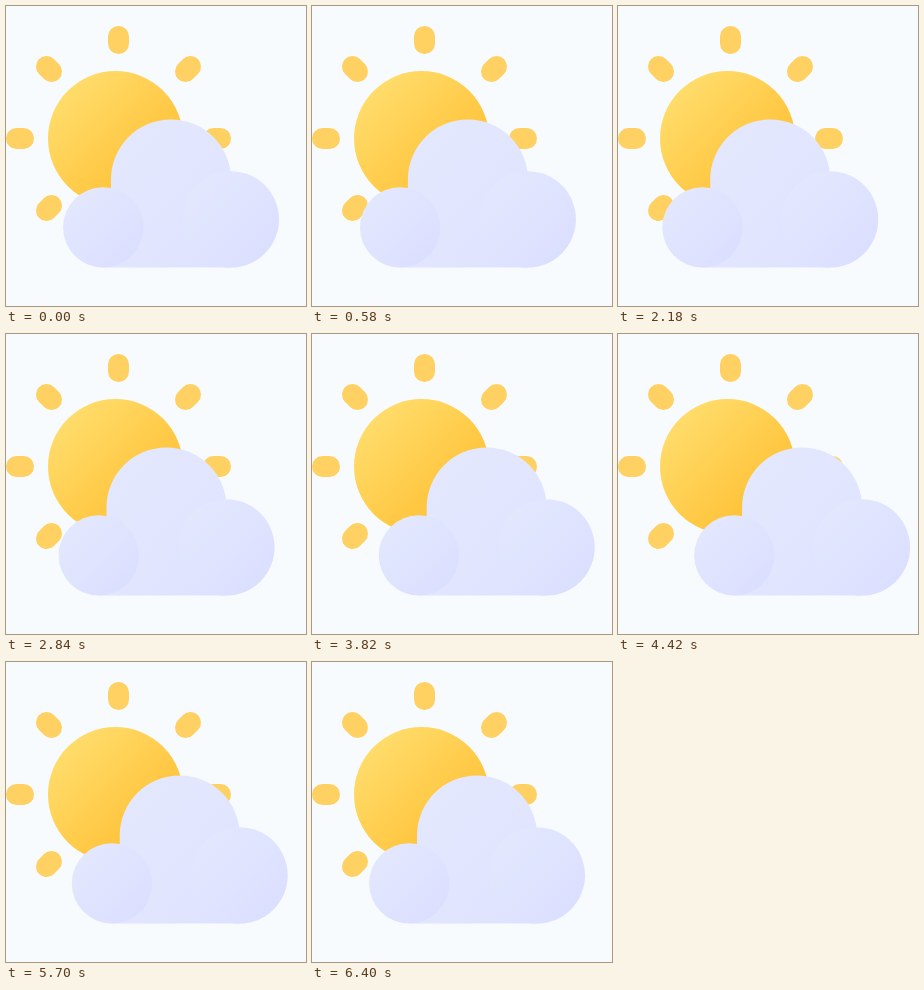
Recreate the animation shown at these times as an HTML page. Size 300 px wide and 300 px high, loop 6440 ms.

```html
<!DOCTYPE html>
<html lang="en">
<head>
<meta charset="utf-8">
<title>Partly cloudy</title>
<style>
  html, body { margin: 0; width: 100%; height: 100%; overflow: hidden; background: #f7fbfd; }
  svg { display: block; width: 100vw; height: 100vh; }
</style>
</head>
<body>
<svg viewBox="0 0 300 300">
  <defs>
    <linearGradient id="gold" x1=".1" y1=".1" x2=".9" y2=".9">
      <stop stop-color="#ffde6e"/>
      <stop offset="1" stop-color="#ffbc2c"/>
    </linearGradient>
    <linearGradient id="mist" x1=".1" y1=".1" x2=".9" y2=".9">
      <stop stop-color="#e3e8fe"/>
      <stop offset="1" stop-color="#dbdfff"/>
    </linearGradient>
    <linearGradient id="body" x1="0" y1="0" x2="1" y2="1">
      <stop stop-color="#e4e9fd"/>
      <stop offset="1" stop-color="#dfe2ff"/>
    </linearGradient>
  </defs>
  <path fill="none" stroke="#ffd062" stroke-width="21" stroke-linecap="round"
    d="M112.5 30.5v7M10.5 132.5h7M207.5 132.5h7M179.5 65.5l5-5M40.5 60.5l5 5M40.5 204.5l5-5"/>
  <circle cx="109.5" cy="132.5" r="67.5" fill="url(#gold)"/>
  <g id="cloud">
    <path fill="url(#body)" d="M105 173.5a60 60 0 0 1 120 0v88H97V222h8z"/>
    <circle cx="97.25" cy="221.4" r="40.2" fill="url(#mist)"/>
    <circle cx="224.8" cy="213.4" r="48.2" fill="url(#mist)"/>
  </g>
</svg>
<script>
  const LOOP = 6440, LEG = 1600;
  // Each leg drifts linearly; the return legs start closer in, with a hard jump.
  const legs = [[0, -25], [-20, 0], [0, 25], [20, 0]];
  const cloud = document.getElementById("cloud");

  function offset(t) {
    const leg = legs[Math.floor(t / LEG)];
    if (!leg) return 0;
    const [from, to] = leg;
    return from + (to - from) * (t % LEG) / LEG;
  }

  function draw() {
    cloud.setAttribute("transform", `translate(${offset(performance.now() % LOOP)} 0)`);
    requestAnimationFrame(draw);
  }
  draw();
</script>
</body>
</html>
```
